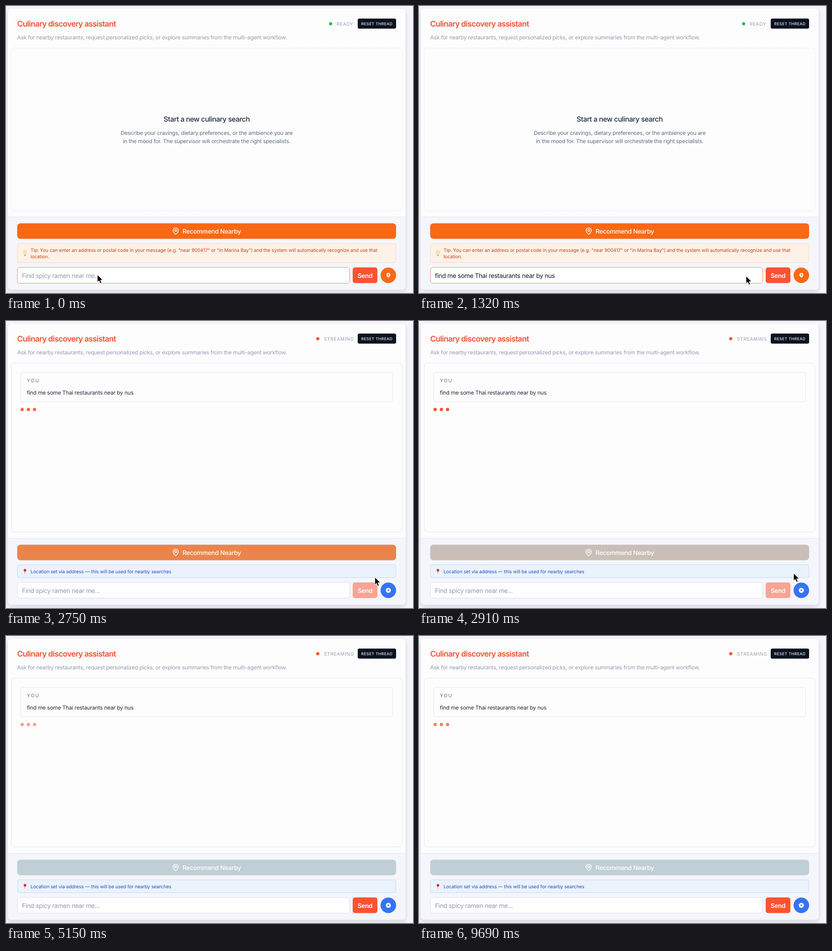
Write an HTML page that moves like this. It is 891 px wide and 628 px high and loops after 9.79 s.

```html
<!DOCTYPE html>
<html lang="en">
<head>
<meta charset="utf-8">
<title>Culinary discovery assistant</title>
<style>
html, body { margin: 0; width: 100%; height: 100%; overflow: hidden; background: #f5f6fb; }
svg { display: block; }
text { font-family: Inter, "Open Sans", sans-serif; text-rendering: geometricPrecision; white-space: pre; }
.body { font-size: 11.97px; letter-spacing: -.238px; }
.input { font-size: 13.68px; letter-spacing: -.33px; }
.note { font-size: 10.26px; letter-spacing: -.055px; }
.status { font-size: 10.26px; letter-spacing: .66px; fill: #94a0b2; }
.mid { text-anchor: middle; }
</style>
</head>
<body>
<svg width="891" height="628" viewBox="0 0 891 628">
  <defs>
    <filter id="shadow" x="-5%" y="-5%" width="110%" height="112%">
      <feDropShadow dx="0" dy="4" stdDeviation="5" flood-color="#28324f" flood-opacity=".17"/>
    </filter>
    <clipPath id="cardClip"><rect x="4" y="6" width="870.5" height="615" rx="8"/></clipPath>
    <path id="pin" d="M20 10c0 6-8 12-8 12s-8-6-8-12a8 8 0 0 1 16 0Z"/>
  </defs>

  <rect x="4" y="6" width="870.5" height="615" rx="8" fill="#fdfdfd" filter="url(#shadow)"/>
  <g clip-path="url(#cardClip)">
    <rect id="footer" x="3" width="873" height="170" fill="#f4f6fb" stroke="#e3e7f0"/>
  </g>

  <text x="24.5" y="44.6" font-size="17.1" font-weight="600" letter-spacing="-.65" fill="#f4502f">Culinary discovery assistant</text>
  <text x="24.5" y="73.4" class="body" fill="#919db0">Ask for nearby restaurants, request personalized picks, or explore summaries from the multi-agent workflow.</text>
  <rect x="770" y="27.5" width="84" height="22" rx="3.5" fill="#0b1220"/>
  <text x="777.5" y="41.5" font-size="8.55" font-weight="500" letter-spacing=".4" fill="#e9edf3">RESET THREAD</text>
  <rect id="panel" x="11.5" y="92" width="855.5" rx="7" fill="#fdfdfd" stroke="#e0e4ef"/>

  <g id="ready">
    <circle cx="710.7" cy="38.8" r="3.5" fill="#1fbf4f"/>
    <text x="723.5" y="42.6" class="status">READY</text>
    <text x="439.3" y="253" class="mid" font-size="15.4" font-weight="500" letter-spacing="-.44" fill="#1e293b">Start a new culinary search</text>
    <g class="body mid" fill="#5f6d84">
      <text x="439.3" y="282.4">Describe your cravings, dietary preferences, or the ambience you are</text>
      <text x="439.3" y="299.5">in the mood for. The supervisor will orchestrate the right specialists.</text>
    </g>
    <rect x="25" y="519.5" width="828.5" height="42" rx="3.5" fill="#fef1e7" stroke="#fad9ba"/>
    <path d="M39.5 543.5c0-2-2-2.600-2-5a4 4 0 0 1 8 0c0 2.400-2 3-2 5z" fill="#fbe6a4" stroke="#e5cf95" stroke-width=".6"/>
    <path d="M39.700 545h3.600M40.200 546.600h2.600" stroke="#8d887f"/>
    <g class="note" fill="#bd4417">
      <text x="53.700" y="537.800">Tip: You can enter an address or postal code in your message (e.g. "near 900417" or "in Marina Bay") and the system will automatically recognize and use that</text>
      <text x="53.700" y="551.600">location.</text>
    </g>
    <circle cx="837" cy="589.3" r="17" fill="#f96815"/>
    <use href="#pin" transform="translate(830.800 583) scale(.52)" fill="#fff"/>
    <circle cx="837" cy="588.200" r="1.600" fill="#f96815"/>
  </g>

  <g id="streaming">
    <circle cx="682.500" cy="38.800" r="3.500" fill="#fb5133"/>
    <text x="695.700" y="42.600" class="status">STREAMING</text>
    <rect x="32" y="112.300" width="814.500" height="64.500" rx="4" fill="#fdfdfd" stroke="#e2e7ef"/>
    <text x="46" y="133.500" font-size="10.260" letter-spacing="1.850" fill="#5b6a82">YOU</text>
    <text x="45.700" y="160.500" class="body" style="letter-spacing:-.2px" fill="#1e293b">find me some Thai restaurants near by nus</text>
    <g id="dots" fill="#fb5133">
      <circle cx="35.400" cy="193.700" r="3.600"/><circle cx="49" cy="193.700" r="3.600"/><circle cx="62.500" cy="193.700" r="3.600"/>
    </g>
    <rect x="25" y="533.500" width="828.500" height="28" rx="3.500" fill="#eaf2fc" stroke="#c1d8f6"/>
    <path d="M41.300 546v6.500" stroke="#8f98a5" stroke-width="1.100"/>
    <circle cx="41.500" cy="545.400" r="2.800" fill="#d92e2e"/>
    <text x="53.700" y="551.600" class="note" fill="#2848c4">Location set via address — this will be used for nearby searches</text>
    <circle cx="837" cy="589.300" r="17" fill="#3574f2"/>
    <circle cx="837" cy="589.300" r="5.500" fill="#fff"/>
    <path d="M835.200 587.500l3.600 3.600m0-3.600l-3.600 3.600" stroke="#3574f2" stroke-width="1.300"/>
  </g>

  <g id="recommend">
    <rect id="recommendFill" x="24.500" y="475.500" width="829.500" height="34" rx="7"/>
    <g transform="translate(363 484) scale(.71)" fill="none" stroke="#fff" stroke-width="2">
      <use href="#pin"/><circle cx="12" cy="10" r="3"/>
    </g>
    <text x="386.500" y="497.800" class="input" font-weight="500" fill="#fff">Recommend Nearby</text>
  </g>

  <rect id="field" x="25" y="572" width="727.500" height="34.500" rx="5" fill="#fefefe"/>
  <text id="entry" x="35" y="594.700" class="input"></text>
  <g id="send">
    <rect x="759" y="572" width="54" height="34.300" rx="5" fill="#ff5232"/>
    <text x="769.700" y="594.700" class="input" font-weight="600" fill="#fff">Send</text>
  </g>

  <g id="mouse" stroke-linejoin="round">
    <path id="arrow" d="M0 0v16.500l3.700-3.500 2.600 6.200 3-1.300-2.600-6h5.300z" fill="#000" stroke="#fff"/>
    <path id="hand" d="M-1.500 1.200c0-2 3-2 3 0v6c.4-1.600 2.900-1.500 3 .2 .5-1.200 2.700-1 2.800.7 .6-1 2.700-.7 2.700 1.200v4c0 2-1.500 3-1.500 5v1.800h-8v-1.800c0-2-4-4.500-5-7.300-.6-1.800 1.500-2.200 2.400-.8l.6 1zM2.200 13v4m2.500-4v4" fill="#fff" stroke="#000" stroke-width="1.100"/>
  </g>
</svg>

<script>
const LOOP = 9790, TYPE_START = 330, TYPE_END = 1000, CLICK = 2340, STREAM = 2700;
const QUERY = 'find me some Thai restaurants near by nus';
const $ = id => document.getElementById(id);
const set = (id, attrs) => { for (const k in attrs) $(id).setAttribute(k, attrs[k]); };
const show = (id, on) => { $(id).style.display = on ? '' : 'none'; };
const clamp = v => Math.min(1, Math.max(0, v));
const mix = (a, b, p) => a.map((v, i) => v + (b[i] - v) * p);
const smooth = p => p * p * (3 - 2 * p);

// Keys are [time, ...values].
function track(keys, t, ease = p => p) {
  const i = keys.findIndex(k => k[0] > t);
  if (i === 0) return keys[0].slice(1);
  if (i < 0) return keys[keys.length - 1].slice(1);
  const a = keys[i - 1], b = keys[i];
  return mix(a, b, ease((t - a[0]) / (b[0] - a[0]))).slice(1);
}

const MOUSE = [[950, 200, 588], [1320, 716, 591], [1650, 773.5, 585], [2500, 773.5, 585],
  [2880, 820, 552], [3100, 820, 552], [3500, 900, 520]];
const SEND = [[CLICK, 1], [2380, .2], [2520, .5], [2920, .5], [3120, 1]];

function draw(t) {
  const streaming = t >= STREAM, focused = t < CLICK;
  show('ready', !streaming);
  show('streaming', streaming);
  set('footer', { y: streaming ? 475.5 : 461.5 });
  set('panel', { height: streaming ? 369.5 : 356, 'stroke-dasharray': streaming ? 'none' : '2 1.5' });

  const fade = 1 - (1 - clamp((t - STREAM) / 400)) ** 2.5;
  set('recommend', { transform: `translate(0 ${streaming ? 14 : 0})` });
  set('recommendFill', { fill: `rgb(${mix([249, 104, 21], [192, 206, 213], fade)})` });

  const count = streaming ? 0 : Math.floor(QUERY.length * clamp((t - TYPE_START) / (TYPE_END - TYPE_START)));
  $('entry').textContent = count ? QUERY.slice(0, count) : 'Find spicy ramen near me...';
  set('entry', { fill: count ? '#111827' : '#929cac' });
  set('field', { stroke: focused ? '#f2896e' : '#d9deea' });
  set('send', { opacity: track(SEND, t)[0] });
  set('dots', { opacity: .75 + .25 * Math.cos((t - 2910) / 934 * 2 * Math.PI) });

  const [x, y] = track(MOUSE, t, smooth), pointing = x > 758 && x < 813 && y > 571;
  set('mouse', { transform: `translate(${x} ${y})` });
  show('hand', pointing);
  show('arrow', !pointing);
}

function tick() {
  draw(performance.now() % LOOP);
  requestAnimationFrame(tick);
}
tick();
</script>
</body>
</html>
```
